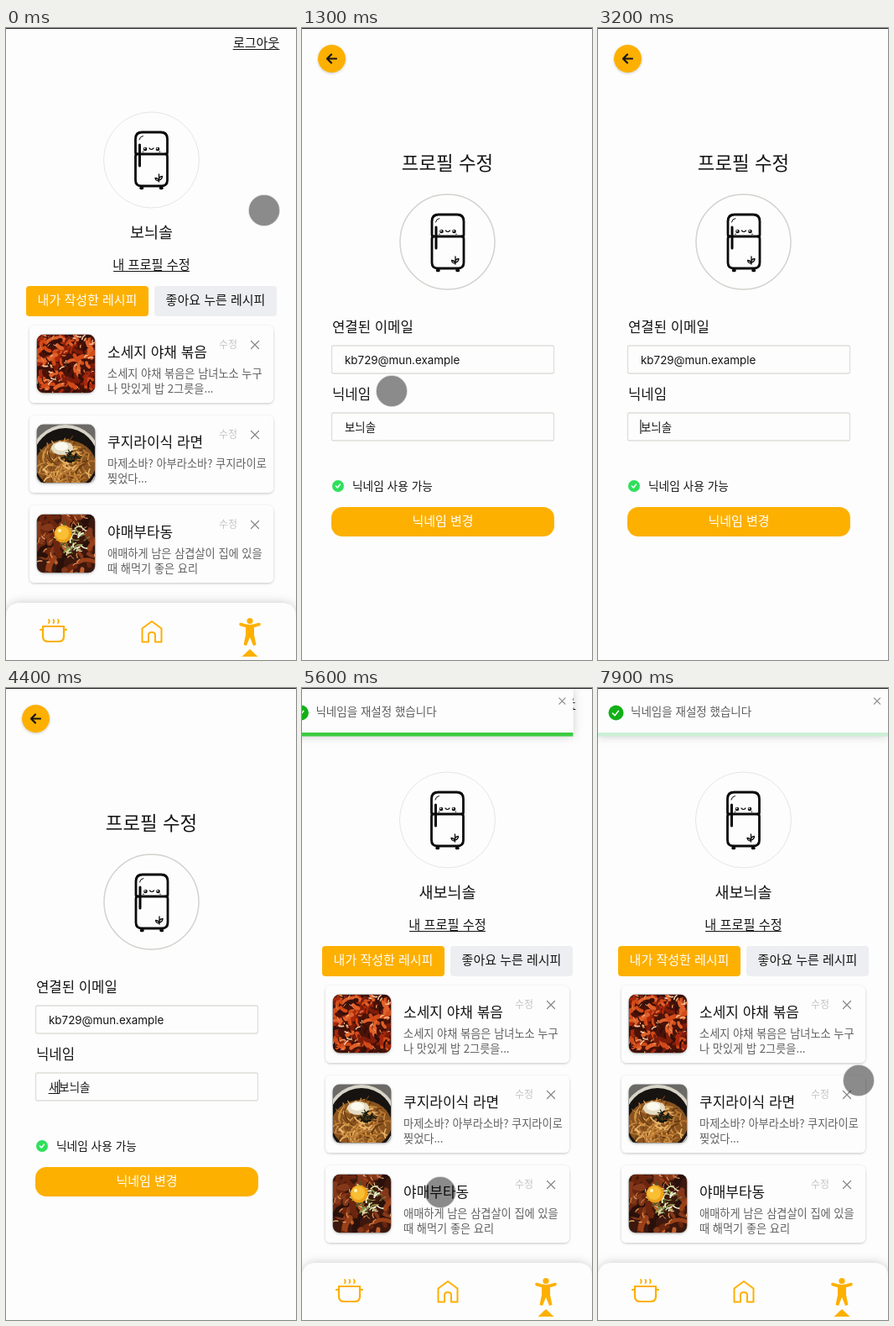
Animation of 346 by 752 pixels, one loop 8 s. Source, as an HTML page:

```html
<!DOCTYPE html>
<html lang="ko">
<head>
<meta charset="utf-8">
<title>프로필 수정</title>
<style>
html, body { margin: 0; width: 100%; height: 100%; overflow: hidden; background: #fdfdfd; }
svg { display: block; width: 100vw; height: 100vh; }
text { font-family: "Noto Sans CJK KR", "Noto Sans CJK", "Noto Sans CJK JP", sans-serif; fill: #151515; white-space: pre; }
.latin { font-family: Inter, "Noto Sans CJK KR", sans-serif; }
.mid { text-anchor: middle; }
.line { fill: none; stroke-linecap: round; stroke-linejoin: round; }
</style>
</head>
<body>
<svg id="stage" viewBox="0 0 346 752" preserveAspectRatio="none">
  <defs>
    <filter id="soft" x="-20%" y="-40%" width="140%" height="180%">
      <feDropShadow dx="0" dy="1" stdDeviation="1.5" flood-color="#000" flood-opacity=".22"/>
    </filter>
    <filter id="glow" x="-10%" y="-50%" width="120%" height="200%">
      <feDropShadow dx="0" dy="0" stdDeviation="6" flood-color="#000" flood-opacity=".2"/>
    </filter>
    <clipPath id="photo"><rect width="69" height="69" rx="8"/></clipPath>
    <g id="fridge" class="line" stroke="#0a0a0a" stroke-width="2.8">
      <path d="M-19 -9V-25Q-19 -33 -11 -33H11Q19 -33 19 -25V-9Q19 -7 17 -7H-17Q-19 -7 -19 -9Z"/>
      <path d="M-17 -7Q-19 -7 -19 -4V24Q-19 31 -12 31H12Q19 31 19 24V-4Q19 -7 17 -7"/>
      <path d="M-14 -18V7" stroke-width="3"/>
      <path d="M-12.500 33.500H-11M11 33.500H12.500" stroke-width="3.600"/>
      <path d="M-14.500 -24Q-14 -28 -10 -28.500" stroke-width="1"/>
      <path d="M-2.500 -14Q0 -11 2.500 -14" stroke-width="1.200"/>
      <path d="M9 26V17M9 25Q5 25 4.500 21.500Q8 21.500 9 25M9 23Q9 20 13 19.500Q13 23 9 24" stroke-width="1.300"/>
      <g stroke="none" fill="#0a0a0a">
        <circle cx="-7.500" cy="-13" r="2.300"/><circle cx="7.500" cy="-13" r="2.300"/>
        <circle cx="-10" cy="-9.700" r=".7"/><circle cx="10" cy="-9.700" r=".7"/>
      </g>
      <g stroke="none" fill="#fff"><circle cx="-8" cy="-13.700" r=".9"/><circle cx="7" cy="-13.700" r=".9"/></g>
    </g>
  </defs>
  <rect width="346" height="752" fill="#fdfdfd"/>
  <g id="home"></g>
  <g id="edit"></g>
  <g id="toast"></g>
  <rect width="346" height="1" fill="#222"/>
  <circle id="dot" r="18" fill="#000" fill-opacity=".45" stroke="#808080" stroke-opacity=".4" stroke-width="1.500"/>
</svg>
<script>
const LOOP = 8000, PAPER = '#fdfdfd', INK = '#151515', ORANGE = '#fdb000', GREEN = '#2fe05c';
const NAME = '보늬솔', PREFIX = '새';
const $ = id => document.getElementById(id);

const text = (x, y, size, str, attrs = '') =>
  `<text x="${x}" y="${y}" font-size="${size}" ${attrs}>${str}</text>`;
const rect = (x, y, w, h, r, fill, attrs = '') =>
  `<rect x="${x}" y="${y}" width="${w}" height="${h}" rx="${r}" fill="${fill}" ${attrs}/>`;
const line = (d, color, width, attrs = '') =>
  `<path class="line" d="${d}" stroke="${color}" stroke-width="${width}" ${attrs}/>`;
const disc = (x, y, r, fill, attrs = '') =>
  `<circle cx="${x}" cy="${y}" r="${r}" fill="${fill}" ${attrs}/>`;
const oval = (x, y, rx, ry, fill) =>
  `<ellipse cx="${x}" cy="${y}" rx="${rx}" ry="${ry}" fill="${fill}"/>`;
const tick = (x, y, s) => line(`M${x - s} ${y}l${s * .75} ${s * .75}l${s * 1.2} ${-s * 1.5}`, '#fff', 1.5);
const cross = (x, y, s, color) =>
  line(`M${x - s} ${y - s}L${x + s} ${y + s}M${x + s} ${y - s}L${x - s} ${y + s}`, color, 1.2);

function random(seed) {
  return () => (seed = seed * 16807 % 2147483647) / 2147483647;
}

// Scatter short curved strokes inside an ellipse
function scatter(seed, count, colors, len, width, cx = 34, cy = 35, rx = 44, ry = 44) {
  const rnd = random(seed);
  let out = '';
  for (let i = 0; i < count; i++) {
    const r = Math.sqrt(rnd()), at = rnd() * 2 * Math.PI, a = rnd() * Math.PI, l = len * (.5 + rnd());
    const dx = l * Math.cos(a), dy = l * Math.sin(a);
    const x = cx + rx * r * Math.cos(at) - dx / 2, y = cy + ry * r * Math.sin(at) - dy / 2;
    const color = colors[Math.floor(rnd() * colors.length)];
    out += line(`M${x.toFixed(1)} ${y.toFixed(1)}q${(dx / 2 - dy / 4).toFixed(1)} ${(dy / 2 + dx / 4).toFixed(1)} ` +
      `${dx.toFixed(1)} ${dy.toFixed(1)}`, color, (width * (.6 + rnd() * .7)).toFixed(1));
  }
  return out;
}

const photos = [
  rect(0, 0, 69, 69, 0, '#4a1208') +
    scatter(71, 120, ['#a8280c', '#d24a18', '#7e1c0a', '#e0602a', '#35100a'], 11, 4.5) +
    scatter(19, 60, ['#f2a468', '#ee8a4c', '#f8c8a0'], 4, 1.3) + scatter(33, 30, ['#2c0c06'], 6, 1.5),
  rect(0, 0, 69, 69, 0, '#6c6a66') +
    oval(34, 42, 42, 42, '#d8d4c8') + oval(34, 43, 39, 39, '#171310') + oval(34, 47, 36, 29, '#8a5420') +
    scatter(43, 130, ['#d0903e', '#e8b468', '#6a3c14', '#b87630'], 12, 1.6, 34, 47, 32, 26) +
    oval(30, 28, 13, 8, '#e4dcc4') + oval(29, 26, 8, 5, '#fbf8ee') +
    scatter(8, 28, ['#14140e', '#2a2c1a'], 4, 2, 40, 38, 11, 6),
  rect(0, 0, 69, 69, 0, '#3c180e') +
    scatter(27, 60, ['#9a4018', '#c2602a', '#6c260e', '#84381a', '#2a100a'], 14, 6) +
    scatter(5, 34, ['#e8a466', '#d88848'], 5, 1.3) +
    scatter(64, 60, ['#dcdca4', '#8c9a4c', '#b8bc74', '#eef0d4', '#4c5424'], 7, 1.5, 42, 28, 18, 18) +
    disc(31, 23, 10.5, '#eda018') + disc(30, 22, 8, '#f9bf34') + disc(27, 19, 2, '#fff2c0')
];

const cards = [
  ['소세지 야채 볶음', '소세지 야채 볶음은 남녀노소 누구', '나 맛있게 밥 2그릇을...'],
  ['쿠지라이식 라면', '마제소바? 아부라소바? 쿠지라이로', '찢었다...'],
  ['야매부타동', '애매하게 남은 삼겹살이 집에 있을', '때 해먹기 좋은 요리']
];

function card([title, first, second], i) {
  return `<g transform="translate(0 ${i * 107})">` +
    rect(28, 354, 291, 92, 6, PAPER, 'filter="url(#soft)"') +
    rect(36.5, 364.5, 70, 70, 8.5, '#777', 'filter="url(#soft)"') +
    `<g transform="translate(37 365)" clip-path="url(#photo)">${photos[i]}</g>` +
    text(121, 392, 17, title) +
    text(254, 380.5, 12, '수정', 'style="fill:#c4c4c4"') + cross(297, 377, 4.5, '#858585') +
    text(121, 415.5, 13.2, first, 'style="fill:#606060"') +
    text(121, 433.5, 13.2, second, 'style="fill:#606060"') + '</g>';
}

function nav() {
  return `<path d="M0 760V702Q0 684 18 684H328Q346 684 346 702V760Z" fill="${PAPER}" filter="url(#glow)"/>` +
    line('M44 712H69V724Q69 730 63 730H50Q44 730 44 724ZM44 716H41M69 716H72', ORANGE, 2.2) +
    line('M51 704q1.500 2 0 4M56.500 704q1.500 2 0 4M62 704q1.500 2 0 4', ORANGE, 1.8) +
    line('M162.500 714.500L174 706L185.500 714.500V730.500H178V722Q178 719 174 719Q170 719 170 722V730.500H162.500Z', ORANGE, 2) +
    disc(291, 705.5, 3.6, ORANGE) +
    line('M280 709.500Q291 714 302 709.500', ORANGE, 3.6) +
    `<path d="M286 711H296L296 722L298.500 734L295 735L291 725L287 735L283.500 734L286 722Z" fill="${ORANGE}"/>` +
    `<path d="M281.500 748L291 739L300.500 748Z" fill="${ORANGE}"/>`;
}

$('home').innerHTML =
  text(271, 23, 15, '로그아웃') + line('M271 25.500H326', INK, 1) +
  disc(173.5, 157, 57, PAPER, 'stroke="#e6e6e2"') +
  '<use href="#fridge" x="173.500" y="157"/>' +
  text(173.5, 249.5, 18.5, NAME, 'id="owner" class="mid"') +
  text(173.5, 286.5, 15.2, '내 프로필 수정', 'class="mid"') + line('M128.500 289.500H218.500', INK, 1) +
  rect(24, 307, 146, 36, 4, ORANGE) + rect(177, 307, 146, 36, 4, '#edeef1') +
  text(97, 329, 15, '내가 작성한 레시피', 'class="mid" style="fill:#fff"') +
  text(250, 329, 15, '좋아요 누른 레시피', 'class="mid"') +
  cards.map(card).join('') + nav();

const field = y => rect(35.5, y, 265, 33, 2, PAPER, 'stroke="#dededa" stroke-width="1.300"');
$('edit').innerHTML =
  disc(35.5, 36.5, 16.5, ORANGE, 'filter="url(#soft)"') +
  line('M41 36.500H30.500M35 31.500L30 36.500L35 41.500', INK, 2.2) +
  text(173.5, 168.5, 22.4, '프로필 수정', 'class="mid"') +
  disc(173.5, 254.5, 56.5, PAPER, 'stroke="#d2d2ce" stroke-width="1.500"') +
  '<use href="#fridge" x="174" y="255"/>' +
  text(36, 361.5, 16.7, '연결된 이메일') + field(378) +
  text(51, 400, 13.4, 'kb729@mun.example', 'class="latin"') +
  text(36, 441.5, 16.7, '닉네임') + field(458) +
  text(51, 479.5, 13.4, NAME, 'id="value"') +
  line('M51 482.500H63', INK, 1, 'id="compose"') +
  rect(0, 466, 1.3, 17, 0, '#333', 'id="caret"') +
  disc(43, 545, 7, GREEN) + tick(43, 545, 2.6) +
  text(60, 550, 13.7, '닉네임 사용 가능', 'font-weight="500"') +
  '<g id="button">' + rect(35, 570, 266, 35, 13, ORANGE, 'id="face"') +
  text(168, 592, 15, '닉네임 변경', 'id="label" class="mid"') + '</g>';

$('toast').innerHTML =
  rect(0, 1, 346, 56, 0, PAPER, 'filter="url(#glow)"') +
  rect(0, 53, 346, 4.5, 0, '#cdf0d6') + rect(0, 53, 346, 4.5, 0, '#3ccb41', 'id="bar"') +
  disc(21.5, 29.5, 9, '#12b016') + tick(21, 30, 3.6) +
  text(39, 32.5, 13.5, '닉네임을 재설정 했습니다', 'style="fill:#5c5c5c"') +
  cross(333, 15.5, 3.6, '#8c8c8c');

const clamp = v => Math.max(0, Math.min(1, v));
const part = (t, a, b) => clamp((t - a) / (b - a));
const smooth = p => p * p * (3 - 2 * p);
const easeOut = p => 1 - (1 - p) ** 3;
const show = (id, on) => $(id).setAttribute('visibility', on ? 'visible' : 'hidden');

// Walk through keys of [time, ...values]
function along(keys, t, ease) {
  let i = 0;
  while (i < keys.length - 2 && t >= keys[i + 1][0]) i++;
  const a = keys[i], b = keys[i + 1], p = ease(part(t, a[0], b[0]));
  return a.slice(1).map((v, k) => v + (b[k + 1] - v) * p);
}

const path = [[100, 308, 217], [550, 173, 283], [900, 173, 283], [1300, 107, 432], [1750, 62, 476],
  [4600, 62, 476], [5000, 165, 600], [6500, 165, 600], [7300, 311, 467]];
const bounce = [[5220, 3000], [5640, -25], [5745, 10], [5850, -5], [5920, 0]];

function draw() {
  const t = performance.now() % LOOP;
  const editing = t >= 800 && t < 5400;
  $('home').style.display = editing ? 'none' : '';
  $('edit').style.display = editing ? '' : 'none';
  $('owner').textContent = t < 800 ? NAME : PREFIX + NAME;

  const typed = t < 3900 ? '' : t < 4150 ? 'ㅅ' : PREFIX;
  const focus = editing && t >= 1900 && t < 4900;
  $('value').textContent = (t < 1900 ? '' : typed) + NAME;
  show('compose', focus && typed);
  show('caret', focus && (typed || (t - 1900) % 1000 < 600));
  $('caret').setAttribute('x', typed ? 63 : 50.3);

  const p = smooth(part(t, 4950, 5200));
  $('button').setAttribute('transform',
    `translate(168 ${587.5 - 2.8 * p}) scale(${1 + .083 * p}) translate(-168 -587.5)`);
  const mix = (a, b) => `rgb(${a.map((v, i) => Math.round(v + (b[i] - v) * p))})`;
  $('face').setAttribute('fill', mix([253, 176, 0], [47, 224, 92]));
  $('label').style.fill = mix([255, 255, 255], [21, 21, 21]);

  $('toast').style.display = t >= 5400 ? '' : 'none';
  $('toast').setAttribute('transform', `translate(${along(bounce, t, easeOut)[0]} 0)`);
  $('bar').setAttribute('width', 346 * (1 - part(t, 5833, 7833)));

  const [x, y] = along(path, t, smooth);
  $('dot').setAttribute('transform', `translate(${x} ${y})`);
  $('dot').setAttribute('opacity', t < 3000 ? 1 - part(t, 1850, 2050) : part(t, 4550, 4700));
  requestAnimationFrame(draw);
}
draw();
</script>
</body>
</html>
```
